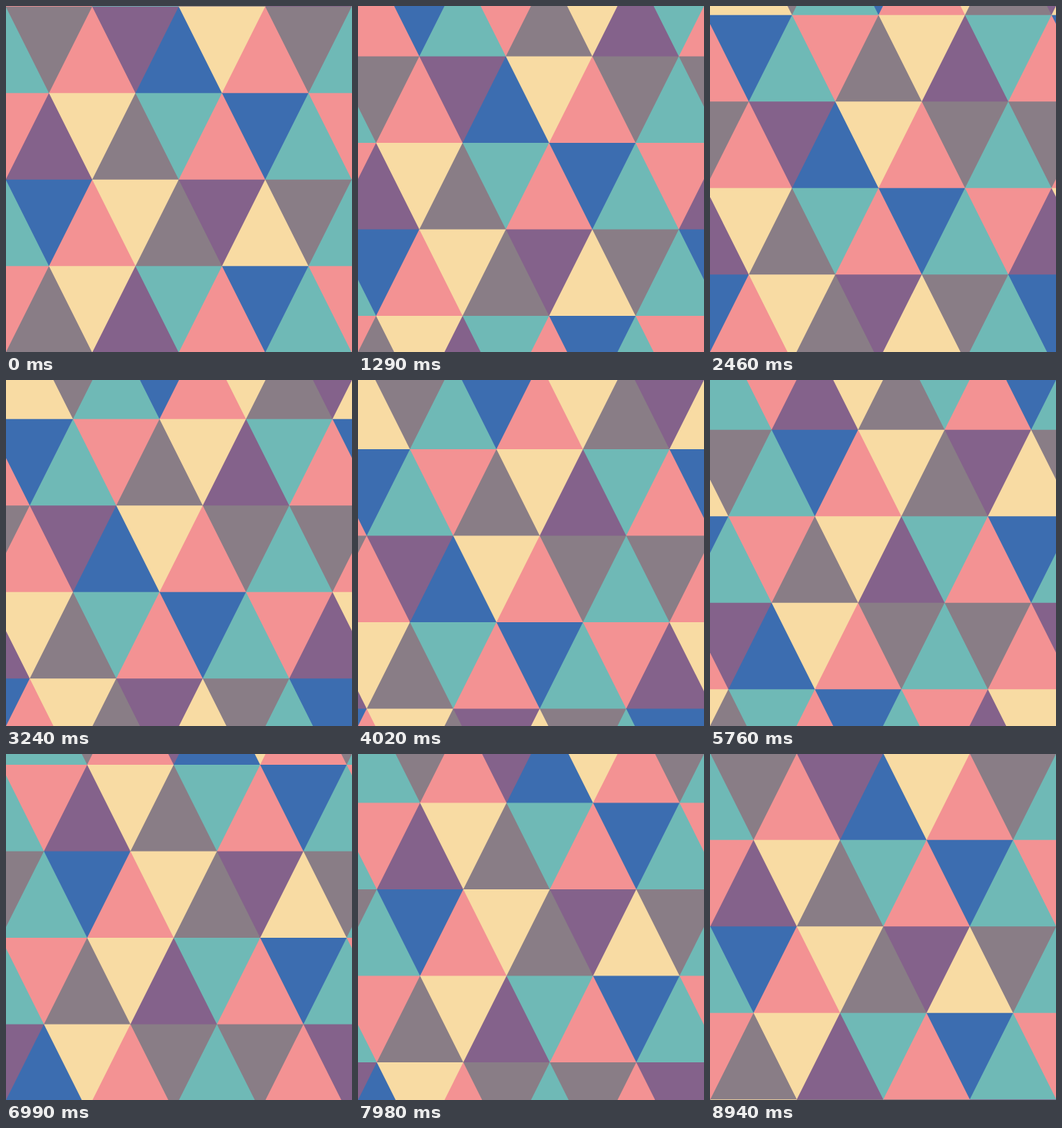
An HTML page that plays this animation: 450 px wide and 450 px high, repeating every 8970 ms.

```html
<!DOCTYPE html>
<html lang="en">
<head>
<meta charset="utf-8">
<title>Drifting triangles</title>
<style>
  html, body { margin: 0; width: 100%; height: 100%; overflow: hidden; }
  svg { display: block; width: 100%; height: 100%; }
</style>
</head>
<body>
<svg viewBox="0 0 450 450"><g id="pattern"></g></svg>
<script>
const SIDE = 112.5;
const STEP_MS = 30;
const STEPS = 299;

const COLORS = {
  G: '#897d86', T: '#6fb9b6', P: '#f39293',
  V: '#84628b', B: '#3c6db0', Y: '#f8dba3'
};

// Upward and downward triangles of each row, from left to right
const ROWS = [
  { up: 'TPBP', down: 'GVYG' },
  { up: 'VGPT', down: 'YTBP' },
  { up: 'TPGY', down: 'BYVG' },
  { up: 'GVPT', down: 'YTBP' }
];

const pattern = document.getElementById('pattern');
const wrap = n => ((n % 4) + 4) % 4;

function addPath(d, color) {
  const path = document.createElementNS('http://www.w3.org/2000/svg', 'path');
  path.setAttribute('d', d);
  path.setAttribute('fill', COLORS[color]);
  pattern.append(path);
}

// Upward triangles lie over full blocks, so each gap shows a downward one.
// Shapes run 1px into the next row to avoid seams.
function addRow(row) {
  const { up, down } = ROWS[wrap(row)];
  const shift = 2 * Math.floor(row / 4);
  const y = row * SIDE;
  const left = col => (col + (wrap(row) % 2) / 2) * SIDE;

  for (let col = -2; col < 7; col++) {
    addPath(`M${left(col)} ${y}h${SIDE}v${SIDE + 1}h${-SIDE}z`, down[wrap(col + shift)]);
  }
  for (let col = -2; col < 8; col++) {
    addPath(`M${left(col)} ${y}l${SIDE / 2} ${SIDE}v1h${-SIDE}v-1z`, up[wrap(col + shift)]);
  }
}

for (let row = -5; row < 5; row++) addRow(row);

function draw(ms) {
  const progress = (Math.floor(ms / STEP_MS) % STEPS + 0.5) / STEPS;
  pattern.setAttribute('transform', `translate(${-2 * SIDE * progress} ${4 * SIDE * progress})`);
}

const start = performance.now();
function tick() {
  draw(performance.now() - start);
  requestAnimationFrame(tick);
}
tick();
</script>
</body>
</html>
```
